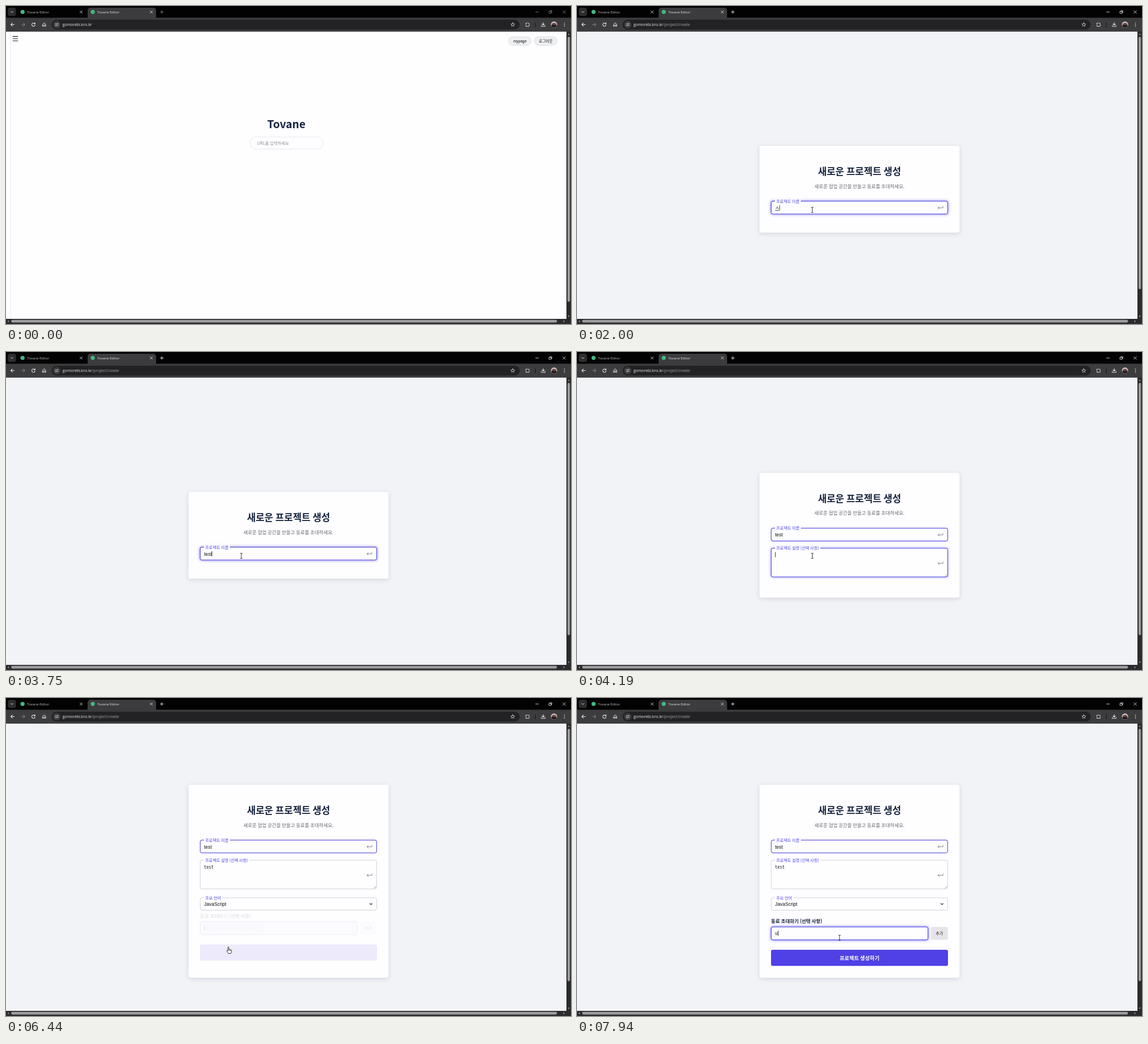
Recreate the animation shown at these times as an HTML page with a canvas. Size 990x557 px, loop 8000 ms.

```html
<!DOCTYPE html>
<html lang="ko">
<head>
<meta charset="utf-8">
<title>Tovane Editor</title>
<style>
html, body { margin: 0; width: 100%; height: 100%; overflow: hidden; background: #020203; }
canvas { display: block; width: 990px; height: 557px; }
</style>
</head>
<body>
<canvas id="stage"></canvas>
<script>
const LOOP = 8000;
const KR = '"Noto Sans CJK KR", "Noto Sans CJK JP", sans-serif';
const UI = '"Open Sans", "Noto Sans", sans-serif';
const ARIAL = '"Liberation Sans", sans-serif';
const MONO = '"Noto Sans Mono CJK KR", "Noto Sans Mono", monospace';
const WHITE = '#fefdff', NAVY = '#16243f', PURPLE = '#4f46e5', GREY = '#cdd0dc', BAR = '#3c3b3d';

const canvas = document.getElementById('stage');
const g = canvas.getContext('2d');
const dpr = window.devicePixelRatio || 1;
canvas.width = 990 * dpr;
canvas.height = 557 * dpr;

const clamp = p => Math.max(0, Math.min(1, p));
const mix = (a, b, p) => a + (b - a) * p;

// CSS "ease": cubic-bezier(.25, .1, .25, 1)
function ease(p) {
  p = clamp(p);
  if (p === 0 || p === 1) return p;
  const at = (m, a, b) => 3 * m * (1 - m) ** 2 * a + 3 * m * m * (1 - m) * b + m ** 3;
  let lo = 0, hi = 1;
  for (let i = 0; i < 20; i++) {
    const m = (lo + hi) / 2;
    if (at(m, .25, .25) < p) lo = m; else hi = m;
  }
  return at(lo, .1, 1);
}
const ramp = (t, start, dur) => ease((t - start) / dur);

function rect(x, y, w, h, fill) {
  g.fillStyle = fill;
  g.fillRect(x, y, w, h);
}

function box(x, y, w, h, r, fill, stroke, lw = .8) {
  g.beginPath();
  g.roundRect(x, y, w, h, r);
  if (fill) { g.fillStyle = fill; g.fill(); }
  if (stroke) { g.strokeStyle = stroke; g.lineWidth = lw; g.stroke(); }
}

function disc(x, y, r, fill) {
  g.beginPath();
  g.arc(x, y, r, 0, 7);
  g.fillStyle = fill;
  g.fill();
}

// cy is the middle of the capitals or syllable blocks
function text(s, x, cy, size, color, { font = KR, weight = 400, align = 'left' } = {}) {
  g.font = `${weight} ${size}px ${font}`;
  g.textAlign = align;
  g.fillStyle = color;
  g.fillText(s, x, cy + size * .37);
  return g.measureText(s).width;
}

function icon(d, x, y, stroke, lw = 1, fill) {
  const path = new Path2D(d);
  g.save();
  g.translate(x, y);
  g.lineCap = g.lineJoin = 'round';
  if (fill) { g.fillStyle = fill; g.fill(path); }
  if (stroke) { g.strokeStyle = stroke; g.lineWidth = lw; g.stroke(path); }
  g.restore();
}

const CROSS = 'M-2-2L2 2M2-2L-2 2';

function tab(x, active) {
  if (active) box(x - 9, 3, 120, 22, 5, BAR);
  disc(x, 10.3, 3.6, '#41b883');
  text('Tovane Editor', x + 8, 11, 6.1, active ? '#e6e6e8' : '#c4c4c7', { font: UI });
  icon(CROSS, x + 102.7, 10.5, '#e0e0e2', .9);
}

function chrome(t, creating) {
  const on = t > 300, ink = '#d8d8da';
  rect(0, 0, 990, 21, '#020203');
  box(3, 3, 14.5, 14.5, 4, '#2d2c2e');
  icon('M-2-1L0 1L2-1', 10.3, 10.5, '#e4e4e6');
  tab(29, false);
  tab(152, true);
  const ctl = on ? '#ececee' : '#858587';
  icon('M-2.6 0H2.6M0-2.6V2.6', 273, 10.5, ctl, .9);
  icon('M-2.5 0H2.5', 930.5, 10.5, ctl, .8);
  icon('M-2.3-1H1.2V2.3H-2.3ZM-1-1V-2.3H2.4V1H1.2', 954, 10.5, ctl, .8);
  icon('M-2.4-2.4L2.4 2.4M2.4-2.4L-2.4 2.4', 978, 10.5, ctl, .8);

  rect(0, 20.5, 990, 24.2, BAR);
  box(80, 24, 820, 17.3, 8.6, '#222124');
  icon('M3 0H-3M-.4-2.7L-3 0L-.4 2.7', 11.5, 32.5, '#e4e4e6', 1.1);
  icon('M-3 0H3M.4-2.7L3 0L.4 2.7', 30, 32.5, '#77777a', 1.1);
  icon('M2.4-1.6A2.9 2.9 0 1 0 2.9.7M2.9-3.2V-1.2H.8', 48, 32.5, '#e4e4e6', 1.1);
  icon('M-2.6-.6L0-3L2.6-.6V3H.9V.8H-.9V3H-2.6Z', 67, 32.5, '#e4e4e6');
  disc(89, 32.6, 6.4, BAR);
  icon('M-2.8-1.4H-.4M2.4-1.4A.9.9 0 1 0 .6-1.4A.9.9 0 1 0 2.4-1.4M2.8 1.5H.4M-.6 1.5A.9.9 0 1 0-2.4 1.5A.9.9 0 1 0-.6 1.5', 89, 32.6, ink, .8);
  const w = text('gomorebi.kro.kr', 99, 32.6, 6.9, '#ececee', { font: UI });
  if (creating) text('/project/create', 99 + w, 32.6, 6.9, '#a5a5a8', { font: UI });
  icon('M0-3.3L1-1.1L3.4-.9L1.6.7L2.1 3L0 1.8L-2.1 3L-1.6.7L-3.4-.9L-1-1.1Z', 888, 32.5, ink, .8);
  icon('M-3-2H-1A1.1 1.1 0 0 1 1-2H2.4V-.2A1.1 1.1 0 0 1 2.4 1.9V3.4H-3V1.7A1.1 1.1 0 0 0-3-.2Z', 914, 32.2, ink);
  rect(927, 29, .9, 8, '#141416');
  icon('M0-3.4V1M-2-1L0 1L2-1M-3.3 1.6V3.2H3.3V1.6', 941.3, 32.5, ink, 1.1);
  disc(960.2, 32.6, 5.5, '#cfc5c9');
  icon('M-4.6 1.4A4.6 4.6 0 0 1 4.6 1.4Z', 960.2, 32.6, null, 0, '#6b443d');
  icon('M-5 2A5.5 5.5 0 0 0 5 2L2 .6H-2Z', 960.2, 32.6, null, 0, '#1c1b1d');
  for (const dy of [-2.8, 0, 2.8]) disc(978.5, 32.6 + dy, .8, ink);
}

function scrollbars(creating) {
  const track = '#2b2a2c', thumb = '#9d9c9f';
  rect(982, 44.7, 8, 513, track);
  rect(0, 548, 990, 9, track);
  box(984, 54, 4.2, (creating ? 496 : 518) - 54, 2.1, thumb);
  box(9, 549.8, 956.5, 4.6, 2.3, thumb);
  icon('M-2 1L0-1.3L2 1Z', 986, 49.6, null, 0, thumb);
  icon('M-2-1L0 1.3L2-1Z', 986, 543.4, null, 0, thumb);
  icon('M1-2L-1.3 0L1 2Z', 4, 552.2, null, 0, thumb);
  icon('M-1-2L1.3 0L-1 2Z', 977.7, 552.2, null, 0, thumb);
}

function listItem(s, y) {
  disc(20, y + .3, 1.4, NAVY);
  text(s, 28, y, 8.4, NAVY);
}

function sidebar(t) {
  const open = ramp(t, 350, 300), edge = mix(8, 152.5, open);
  if (open > 0) {
    g.save();
    g.beginPath();
    g.rect(0, 44, edge, 504);
    g.clip();
    rect(8, 73, 137, .8, '#e4e4ea');
    box(5, 47.5, 60.5, 18.7, 3, '#2d6fc0');
    text('+ 프로젝트 생성', 11, 57.2, 7.45, '#fff', { weight: 500 });
    text('내 프로젝트', 8, 110, 9.7, NAVY, { weight: 700 });
    listItem('프로젝트 연습', 140.2);
    listItem('코딩테스트 연습', 157.7);
    text('참여 프로젝트', 8, 350.8, 9.7, NAVY, { weight: 700 });
    listItem('알고리즘 함께 연습', 381);
    g.restore();
  }
  rect(edge - .4, 44.7, .8, 503.3, '#e6e5ee');
  icon('M-4.3-3.8H4.3M-4.3 0H4.3M-4.3 3.8H4.3', mix(16.3, 140, open), 57.2, '#1f2024', 1.1);
}

function homePage(t) {
  rect(0, 44.7, 982, 503.3, WHITE);
  sidebar(t);
  box(880.7, 54, 39.6, 14.7, 7.3, '#eff0f2', '#d2d5d9', .7);
  text('mypage', 900.5, 61.2, 6.5, '#111', { font: ARIAL, align: 'center' });
  box(925.7, 54, 40, 14.7, 7.3, '#eff0f2', '#d2d5d9', .7);
  text('로그아웃', 945.7, 61.4, 6.5, '#111', { align: 'center' });
  text('Tovane', 491.3, 206.5, 19, NAVY, { weight: 700, align: 'center' });
  box(427.3, 229.4, 128.4, 21, 10.5, WHITE, '#e2e3ec');
  text('URL을 입력하세요', 440, 240, 7.3, '#8d8d95');
}

function field(y, w, h, glow, border) {
  if (glow > 0) {
    g.save();
    g.shadowColor = `rgba(79,70,229,${.75 * glow})`;
    g.shadowBlur = 5 * dpr;
    box(340.3, y, w, h, 3, WHITE, `rgba(79,70,229,${.5 * glow})`, 1.2);
    g.restore();
  }
  box(340.3, y, w, h, 3, WHITE, GREY, .9);
  if (border > 0) {
    g.save();
    g.globalAlpha *= border;
    box(340.3, y, w, h, 3, null, PURPLE, 1);
    g.restore();
  }
}

function label(s, y) {
  g.font = `400 7.1px ${KR}`;
  rect(347, y - 4, g.measureText(s).width + 4.5, 8, WHITE);
  text(s, 349, y, 7.1, PURPLE);
}

const caret = (x, y) => rect(x, y - 4.5, .8, 9, '#111');
const enterIcon = y => icon('M4.5-2.5V.2H-4.3M-2-2.2L-4.4.2L-2 2.6', 636.8, y, '#8b8b98', 1);

// number of keys pressed so far
const keys = (t, start, gap, n) => Math.max(0, Math.min(n, Math.floor((t - start) / gap) + 1));

function nameField(t, y) {
  const focus = ramp(t, 1480, 200), glow = focus * (1 - ramp(t, 4110, 200));
  field(y, 309.2, 22.4, glow, focus);
  label('프로젝트 이름', y);
  const cy = y + 11.5;
  let w = 0;
  if (t < 3050) {
    const n = keys(t, 2000, 140, 4) - keys(t, 2870, 40, 4);
    w = text('ㅅㄷㄴㅅ'.slice(0, n), 347, cy, 8.26, '#111');
    if (n) rect(347 + w - 7.4, cy + 4.2, 7.4, .8, '#111');
  } else {
    w = text('test'.slice(0, keys(t, 3060, 75, 4)), 347, cy, 8.4, '#111', { font: ARIAL });
  }
  if (focus > 0 && t < 4110) caret(347 + w, cy);
  enterIcon(cy);
}

function noteField(t, y) {
  const focus = ramp(t, 4110, 200) * (1 - ramp(t, 5040, 150));
  const border = t < 4400 ? 1 : focus;
  field(y, 309.2, 50.3, focus, border);
  label('프로젝트 설명 (선택 사항)', y);
  const w = text('test'.slice(0, keys(t, 4450, 110, 4)), 347, y + 11.6, 8.26, '#222', { font: MONO });
  if (t > 4110 && t < 5040) caret(347 + w, y + 11.2);
  icon('M-3.5 0L0-3.5M-1.5 0L0-1.5', 648.2, y + 49, '#77777f', .6);
  enterIcon(y + 26.4);
}

function languageField(t, y) {
  const focus = 1 - ramp(t, 6150, 200);
  field(y, 309.2, 21.7, focus, focus);
  label('주요 언어', y);
  if (t < 6250) text('언어를 선택하세요', 347, y + 11, 8.3, '#55555d');
  else text('JavaScript', 347, y + 11, 8.4, '#111', { font: ARIAL });
  icon('M-2.1-1L0 1.1L2.1-1', 639.5, y + 10.9, '#222', 1.1);
}

function inviteSection(t, y, hover) {
  const focus = ramp(t, 6400, 200), typed = t >= 7750;
  text('동료 초대하기 (선택 사항)', 340, y, 8.45, NAVY, { weight: 700 });
  field(y + 10, 274.7, 22.6, focus, focus);
  const w = typed ? text('u', 347, y + 21.2, 8.4, '#111', { font: ARIAL }) : 0;
  if (!typed) text('초대할 사용자 ID 또는 닉네임', 347, y + 21.2, 8.3, '#b4b4c0');
  caret(347.4 + w, y + 21);
  box(620.3, y + 10, 29.5, 22.6, 3, '#e4e4e9');
  text('추가', 635, y + 21.2, 7.1, '#222', { weight: 500, align: 'center' });
  box(340, y + 50, 310, 28.3, 3, hover ? '#4a3fd6' : '#4f41e6');
  text('프로젝트 생성하기', 495, y + 64.4, 9.2, '#fff', { weight: 700, align: 'center' });
}

// fade in while sliding down
function reveal(t, start, paint) {
  if (t < start) return;
  const p = ramp(t, start, 400);
  g.save();
  g.globalAlpha = p;
  paint(-10.3 * (1 - p));
  g.restore();
}

function createPage(t, pointer) {
  rect(0, 44.7, 982, 503.3, '#f1f3f7');
  const h = t < 3850 ? 152 : t < 5050 ? 218.5 : t < 6400 ? 252 : 338;
  const top = 321.1 - h / 2;
  g.save();
  g.shadowColor = 'rgba(20,25,50,.13)';
  g.shadowBlur = 8 * dpr;
  g.shadowOffsetY = 2 * dpr;
  box(319.8, top, 350.6, h, 4, WHITE);
  g.restore();
  text('새로운 프로젝트 생성', 495, top + 44.6, 16.7, NAVY, { weight: 700, align: 'center' });
  text('새로운 협업 공간을 만들고 동료를 초대하세요.', 495, top + 70.4, 8.37, '#66676f', { align: 'center' });
  nameField(t, top + 96.8);
  reveal(t, 3850, dy => noteField(t, top + 132 + dy));
  reveal(t, 5050, dy => languageField(t, top + 197.8 + dy));
  reveal(t, 6400, dy => inviteSection(t, top + 238.9 + dy, pointer.y > 440));
}

const TRACK = [
  [220, 16, 58], [680, 16, 58], [900, 19, 65], [1380, 19, 65], [1720, 412.3, 357],
  [5450, 412.3, 357], [5700, 404, 400], [6020, 404, 400], [6350, 391, 442],
  [6850, 391, 442], [7150, 460, 420]
];

function pointerAt(t) {
  let i = TRACK.findIndex(k => k[0] > t);
  if (i < 0) i = TRACK.length;
  const a = TRACK[Math.max(0, i - 1)], b = TRACK[Math.min(i, TRACK.length - 1)];
  const p = b[0] > a[0] ? ease((t - a[0]) / (b[0] - a[0])) : 1;
  const x = mix(a[1], b[1], p), y = mix(a[2], b[2], p);
  let kind = 'arrow';
  if (t < 1400 || (t > 6400 && y > 439)) kind = 'hand';
  else if ((y > 341 && y < 378 && t < 5700 && x > 340) || (t > 6850 && y < 426)) kind = 'beam';
  return { x, y, kind };
}

function drawPointer({ x, y, kind }) {
  if (kind === 'beam') {
    icon('M-1.6-4.5H-.5L0-4.1L.5-4.5H1.6M0-4.1V4.1M-1.6 4.5H-.5L0 4.1L.5 4.5H1.6', x, y, '#222', .9);
  } else if (kind === 'hand') {
    icon('M-2.3.8V-5A.9.9 0 0 1-.5-5V-1.6Q.5-2.4 1.1-1.3Q2.1-1.8 2.6-.8Q4-1.2 4 .5V2.4Q3.9 4 3 5.5H-1.4Q-2.2 3.6-3.9 1.6Q-4.4.4-3.4.2Q-2.8.2-2.3.8Z', x, y, '#111', .8, '#fff');
    icon('M-.5-1.6V.8M1.1-1.2V.9M2.6-.7V1', x, y, '#111', .5);
  } else {
    icon('M0 0V8.6L2 6.8L3.3 9.8L4.7 9.2L3.4 6.3H6.1Z', x, y, '#111', .7, '#fff');
  }
}

function draw(t) {
  g.setTransform(dpr, 0, 0, dpr, 0, 0);
  const creating = t >= 1400, pointer = pointerAt(t);
  if (creating) createPage(t, pointer); else homePage(t);
  scrollbars(creating);
  chrome(t, creating);
  if (t >= 220) drawPointer(pointer);
}

const start = performance.now();
function tick() {
  draw((performance.now() - start) % LOOP);
  requestAnimationFrame(tick);
}
tick();
</script>
</body>
</html>
```
